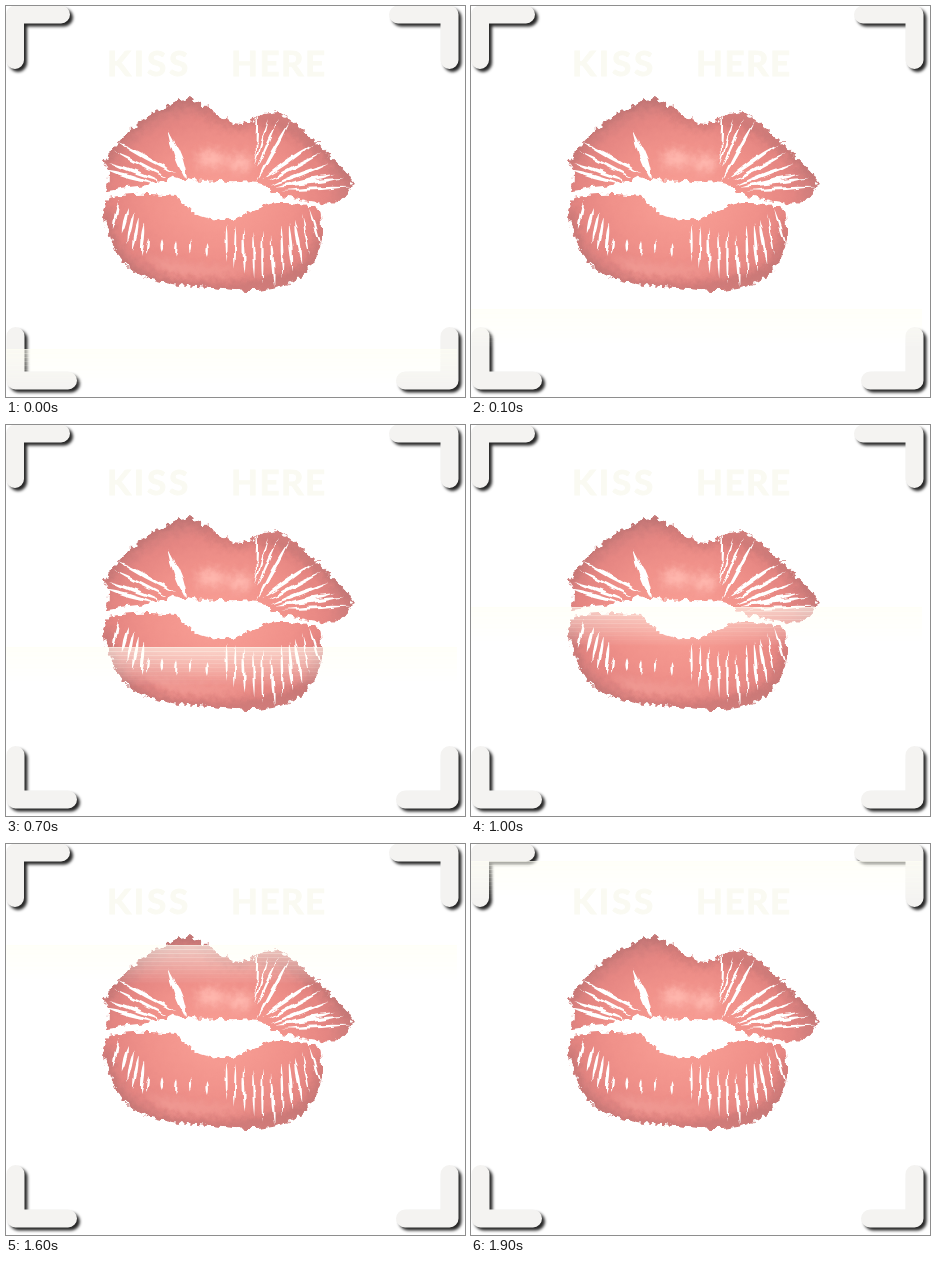
An HTML page that plays this animation: 459 px wide and 391 px high, repeating every 2.2 s.

```html
<!DOCTYPE html>
<html lang="en">
<head>
<meta charset="utf-8">
<title>Kiss scanner</title>
<style>
html, body { margin: 0; width: 100%; height: 100%; overflow: hidden; background: #fff; }
svg { display: block; }
.corners { fill: none; stroke: #f4f3f1; stroke-width: 18; stroke-linecap: round; stroke-linejoin: round;
  filter: drop-shadow(3px 3px 1.5px rgba(0, 0, 0, .85)); }
text { font: bold 35px Lato, 'Open Sans', sans-serif; fill: #fafaf2; stroke: #fafaf2; }
</style>
</head>
<body>
<svg width="459" height="391" viewBox="0 0 459 391">
  <defs>
    <radialGradient id="skin" gradientUnits="userSpaceOnUse" cx="0" cy="0" r="1"
      gradientTransform="translate(214 194) scale(132 104)">
      <stop offset="0" stop-color="#faa197"/>
      <stop offset=".55" stop-color="#f0918a"/>
      <stop offset=".8" stop-color="#e58682"/>
      <stop offset="1" stop-color="#cb7c7b"/>
    </radialGradient>
    <filter id="rough" x="-5%" y="-5%" width="110%" height="110%" color-interpolation-filters="sRGB">
      <feTurbulence type="fractalNoise" baseFrequency=".16" numOctaves="2" seed="4"/>
      <feDisplacementMap in="SourceGraphic" scale="9" xChannelSelector="R" yChannelSelector="G"/>
      <feGaussianBlur stdDeviation=".5"/>
    </filter>
    <filter id="worn" x="-5%" y="-5%" width="110%" height="110%" color-interpolation-filters="sRGB">
      <feTurbulence type="fractalNoise" baseFrequency=".09" seed="7"/>
      <feDisplacementMap in="SourceGraphic" scale="6" xChannelSelector="R" yChannelSelector="G"/>
      <feGaussianBlur stdDeviation=".4"/>
    </filter>
    <filter id="soft" x="-50%" y="-50%" width="200%" height="200%"><feGaussianBlur stdDeviation="5"/></filter>
    <clipPath id="lips">
      <path d="M98 155C125 115 160 96 183 92C205 98 215 118 236 118C250 115 250 108 272 106
        C300 122 325 152 347 172C345 190 330 200 315 197C290 192 262 190 258 178
        C240 171 228 180 214 174C195 176 180 174 168 170C150 182 120 179 98 185Q108 172 98 155Z"/>
      <path d="M103 191C130 185 155 189 171 190C180 205 195 213 218 215C240 212 250 197 275 197
        Q300 196 314 204C322 240 308 286 243 285C190 280 150 282 122 261C104 245 106 225 97 212Q98 200 103 191Z"/>
    </clipPath>
  </defs>

  <text x="101" y="70" letter-spacing="2.8">KISS</text>
  <text x="225" y="70" letter-spacing="1.5">HERE</text>

  <g filter="url(#rough)">
    <g clip-path="url(#lips)">
      <path fill="url(#skin)" d="M90 85H355V295H90Z"/>
      <g fill="none" stroke="#b06a6a" stroke-width="7" filter="url(#soft)" opacity=".55">
        <path d="M98 154Q130 105 183 92Q215 118 234 118Q272 100 347 171"/>
        <path d="M100 205Q100 272 170 280T305 262L318 215"/>
      </g>
      <g fill="#ffb9b0" filter="url(#soft)">
        <ellipse cx="205" cy="153" rx="14" ry="8"/>
        <ellipse cx="234" cy="157" rx="12" ry="8"/>
        <path d="M132 247Q165 263 220 263T285 255Q220 274 160 264Z" opacity=".6"/>
      </g>
    </g>
  </g>
  <path id="cracks" fill="#fff" filter="url(#worn)"/>

  <g class="corners">
    <path d="M55 8.5H9V54"/>
    <path d="M392 8.5H443.5V54"/>
    <path d="M9.5 330V374.5H62"/>
    <path d="M399 374.5H443.5V330"/>
  </g>
  <g id="scan" fill="#fffff5"></g>
</svg>
<script>
const $ = id => document.getElementById(id);
const mix = (a, b, k) => a + (b - a) * k;

let seed = 11;
const random = () => (seed = seed * 16807 % 2147483647) / 2147483647;
const jitter = size => (random() - .5) * size;

// A tapered crack, bulging by w on both sides of its middle
function sliver(x1, y1, x2, y2, w) {
  const dx = x2 - x1, dy = y2 - y1, k = w / Math.hypot(dx, dy);
  const mx = (x1 + x2) / 2, my = (y1 + y2) / 2;
  return `M${x1} ${y1}Q${mx - dy * k} ${my + dx * k} ${x2} ${y2}Q${mx + dy * k} ${my - dx * k} ${x1} ${y1}Z`;
}

// n cracks spread evenly from the line a-b to the line c-d
function fan(n, width, [ax, ay], [bx, by], [cx, cy], [dx, dy]) {
  let path = '';
  for (let i = 0; i < n; i++) {
    const k = n > 1 ? i / (n - 1) : 0;
    path += sliver(mix(ax, bx, k) + jitter(3), mix(ay, by, k) + jitter(6),
      mix(cx, dx, k) + jitter(3), mix(cy, dy, k) + jitter(6), width * mix(.7, 1.3, random()));
  }
  return path;
}

$('cracks').setAttribute('d', [
  fan(4, 3.5, [113, 136], [98, 164], [170, 170], [150, 179]),
  fan(2, 5, [161, 124], [166, 136], [179, 174], [182, 174]),
  fan(4, 3, [253, 107], [282, 113], [249, 150], [250, 172]),
  fan(6, 3.2, [306, 140], [346, 182], [256, 176], [276, 185]),
  fan(5, 3, [108, 224], [134, 252], [114, 194], [140, 214]),
  fan(5, 2.5, [141, 246], [200, 252], [143, 230], [200, 235]),
  fan(6, 2.5, [220, 258], [267, 282], [220, 218], [266, 228]),
  fan(5, 3, [276, 273], [315, 240], [276, 220], [303, 204])
].join(''));

// Scan band: one-pixel rows fading downwards, with brighter stripes
let rows = '';
for (let y = 0; y < 39; y++) {
  const alpha = (y % 4 ? .6 : .76) * (1 - y / 39);
  rows += `<rect y="${y}" width="451" height="1" opacity="${alpha.toFixed(3)}"/>`;
}
$('scan').innerHTML = rows;

function draw(now) {
  const t = now % 2200;
  const step = Math.ceil((t - 99.99) / 300);
  // Even steps upwards, then a last leap to the top
  const top = step < 7 ? Math.round(343 - 40.3 * Math.max(step, 0)) : 17;
  $('scan').setAttribute('transform', `translate(0 ${top})`);
  requestAnimationFrame(draw);
}
draw(performance.now());
</script>
</body>
</html>
```
